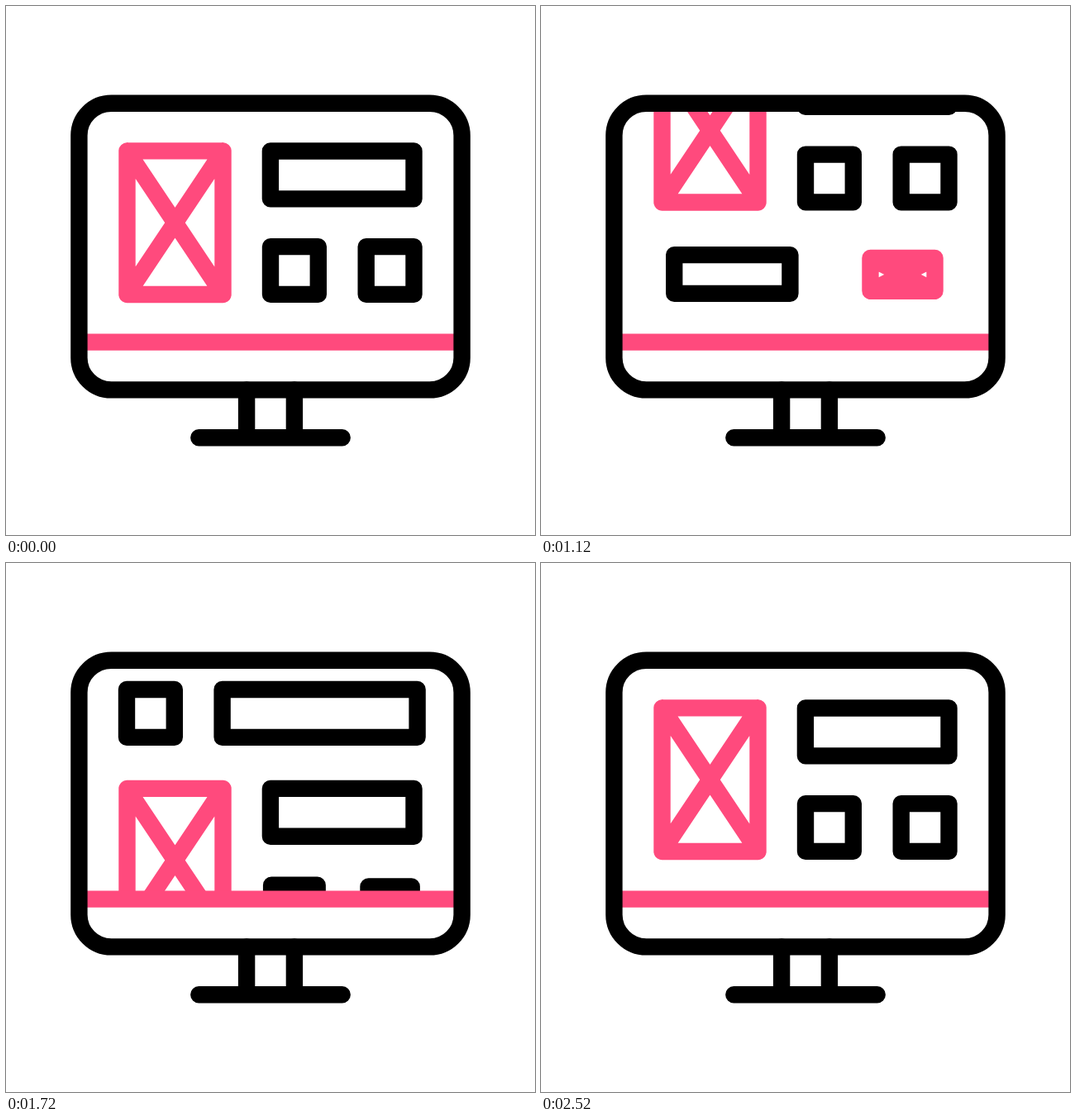
Write an HTML page that moves like this. It is 640 px wide and 640 px high and loops after 3000 ms.

```html
<!DOCTYPE html>
<html lang="en">
<head>
<meta charset="utf-8">
<title>Page layout scrolling on a monitor</title>
<style>
  html, body { margin: 0; width: 100%; height: 100%; overflow: hidden; background: #fff; }
  svg { display: block; width: 100%; height: 100%; }
  path, rect { fill: none; stroke: #000; stroke-width: 20.4; stroke-linecap: round; stroke-linejoin: round; }
  .pink { stroke: #ff4a7d; }
</style>
</head>
<body>
<svg viewBox="0 0 640 640">
  <clipPath id="screen"><path d="M88 117.6H552V406.6H88Z"/></clipPath>
  <g clip-path="url(#screen)"><g id="page"></g></g>
  <path class="pink" d="M98 406.6H542" style="stroke-linecap:butt"/>
  <rect x="88.4" y="117.7" width="463.2" height="346.7" rx="39"/>
  <path d="M291.1 464.5V522.3M348.9 464.5V522.3M233.3 522.3H406.7"/>
</svg>
<script>
const LOOP = 3000;
const SCROLL = { start: 300, length: 2200, distance: 467, ease: 0.567 };
const GROW = { length: 480, ease: 0.526 };
const page = document.getElementById('page');

// Symmetric curve cubic-bezier(a, 0, 1 - a, 1), solved by bisection.
function ease(x, a) {
  if (x <= 0) return 0;
  if (x >= 1) return 1;
  let lo = 0, hi = 1, s;
  for (let i = 0; i < 30; i++) {
    s = (lo + hi) / 2;
    const r = 1 - s;
    const at = 3 * s * r * r * a + 3 * s * s * r * (1 - a) + s ** 3;
    if (at < x) lo = s; else hi = s;
  }
  return s * s * (3 - 2 * s);
}

// Blocks are given by centre and size; "start" is when a block begins to grow.
function block(x, y, w, h, start, crossed = false) {
  const node = document.createElementNS('http://www.w3.org/2000/svg', 'path');
  if (crossed) node.setAttribute('class', 'pink');
  page.append(node);
  return { node, x, y, w, h, start, crossed };
}

function mainSection(top, starts) {
  const [picture, title, left, right] = starts;
  return [
    block(204.5, top + 262.2, 116, 173.6, picture, true),
    block(406.7, top + 204.4, 173.6, 57.9, title),
    block(348.9, top + 320, 57.8, 57.8, left),
    block(464.6, top + 320, 57.8, 57.8, right)
  ];
}

const blocks = [
  ...mainSection(0, [-1000, -1000, -1000, -1000]),
  block(231.3, 436, 173.4, 57.8, 800),
  block(437.5, 436.4, 116, 59, 840, true),
  block(174.9, 551.5, 57.8, 57.8, 920),
  block(379.6, 551.5, 236, 57.8, 960),
  ...mainSection(SCROLL.distance, [1200, 1240, 1320, 1360])
];

function drawBlock({ node, x, y, w, h, start, crossed }, time) {
  const scale = ease((time - start) / GROW.length, GROW.ease);
  node.style.display = scale > 0 ? '' : 'none';
  const l = x - w * scale / 2, r = x + w * scale / 2;
  const t = y - h * scale / 2, b = y + h * scale / 2;
  const cross = crossed ? `M${l} ${t}L${r} ${b}M${r} ${t}L${l} ${b}` : '';
  node.setAttribute('d', `M${l} ${t}H${r}V${b}H${l}Z${cross}`);
}

function render(time) {
  const shift = SCROLL.distance * ease((time - SCROLL.start) / SCROLL.length, SCROLL.ease);
  page.setAttribute('transform', `translate(0 ${-shift})`);
  for (const item of blocks) drawBlock(item, time);
}

const begin = performance.now();
function tick() {
  render((performance.now() - begin) % LOOP);
  requestAnimationFrame(tick);
}
tick();
</script>
</body>
</html>
```
